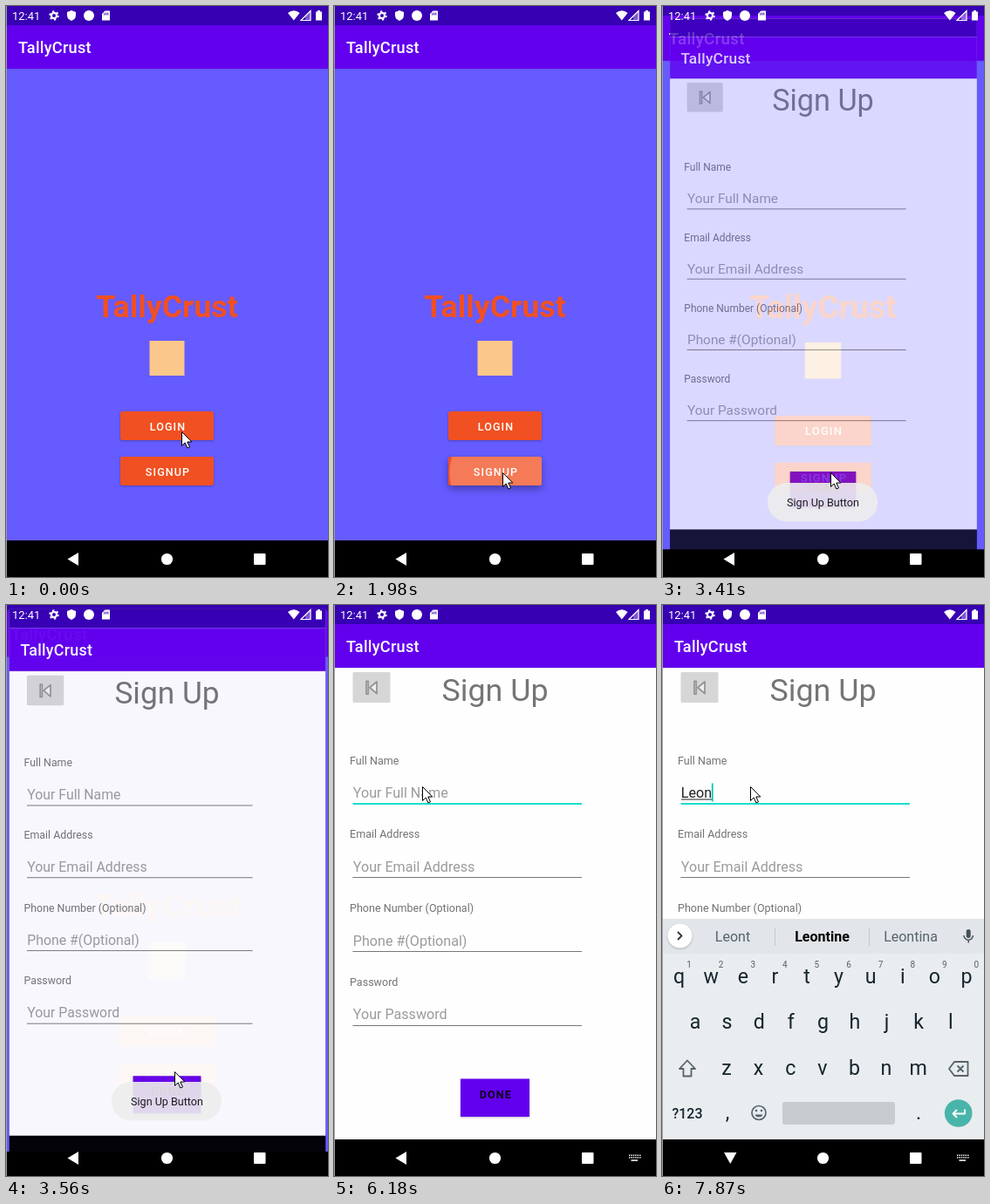
Write an HTML page that moves like this. It is 369 px wide and 655 px high and loops after 8000 ms.

```html
<!DOCTYPE html>
<html lang="en">
<head>
<meta charset="utf-8">
<title>Sign up flow</title>
<style>
  html, body { margin: 0; width: 100%; height: 100%; overflow: hidden; background: #000; }
  svg { display: block; width: 100%; height: 100%; }
  text { font-family: Roboto, Arial, sans-serif; white-space: pre; }
  .mid { text-anchor: middle; }
  .med { font-weight: 500; }
  .caps { font-weight: 500; font-size: 12.5px; letter-spacing: 1.12px; text-anchor: middle; }
  .page { transform-origin: 184.5px 327.5px; }
  .raised { filter: drop-shadow(0 1px 1px rgba(0, 0, 0, .25)); }
  .pressed { filter: drop-shadow(0 4px 4px rgba(0, 0, 0, .32)); }
</style>
</head>
<body>
<svg id="stage" viewBox="0 0 369 655" xmlns="http://www.w3.org/2000/svg"></svg>
<script>
const LOOP = 8000;
const APP = 'TallyCrust';
const NAME = 'Leont';

// Markup helpers
const rect = (x, y, w, h, fill, more = '') =>
  `<rect x="${x}" y="${y}" width="${w}" height="${h}" fill="${fill}" ${more}/>`;
const text = (x, y, str, size, fill, more = '') =>
  `<text x="${x}" y="${y}" font-size="${size}" fill="${fill}" ${more}>${str}</text>`;
const disc = (x, y, r, fill, more = '') =>
  `<circle cx="${x}" cy="${y}" r="${r}" fill="${fill}" ${more}/>`;
const path = (d, fill, more = '') => `<path d="${d}" fill="${fill}" ${more}/>`;
const line = (d, stroke, width) =>
  path(d, 'none', `stroke="${stroke}" stroke-width="${width}" stroke-linejoin="round"`);

const chrome = bg =>
  rect(1, 0, 368, 655, '#000') + rect(1, 0, 368, 613, bg) +
  rect(1, 0, 368, 22, '#3700b3') + rect(1, 22, 368, 50, '#6200ee') +
  rect(1, 72, 368, 1, '#000', 'opacity=".05"') +
  text(14, 53.5, APP, 18.2, '#fff', 'class="med" letter-spacing=".25"');

function welcomePage() {
  const orange = '#f15022';
  const box = (y, fill) => rect(131, y, 107, 33, fill, 'rx="2.5"');
  const button = (y, label, id, extra = '') =>
    `<g id="${id}" class="raised">${box(y, orange)}</g>${extra}` +
    text(185.5, y + 21.7, label, 12.5, '#fff', 'class="caps"');
  const ripple = `<clipPath id="signupBox">${box(517, '#000')}</clipPath>` +
    `<g clip-path="url(#signupBox)">${disc(194, 535, 0, '#fff', 'id="ripple"')}</g>`;
  return chrome('#655bff') +
    text(184.5, 356.5, APP, 35.8, orange, 'class="mid" font-weight="700"') +
    rect(164.5, 384, 40, 40, '#fbc78a') +
    button(465, 'LOGIN', 'login') + button(517, 'SIGNUP', 'signup', ripple);
}

function formPage() {
  const rows = [
    ['Full Name', 'Your Full Name'],
    ['Email Address', 'Your Email Address'],
    ['Phone Number (Optional)', 'Phone #(Optional)'],
    ['Password', 'Your Password']
  ];
  const fields = rows.map(([label, hint], i) => {
    const y = i * 84.8;
    return text(18, 182.5 + y, label, 12.55, '#737373') +
      text(21.8, 221 + y, hint, 16.1, '#9b9b9b', `id="hint${i}"`) +
      rect(21.5, Math.round(227.5 + y), 262.5, 1, '#777', `id="rule${i}"`);
  }).join('');
  const back = rect(21.5, 77, 43, 35, '#d6d6d6', 'rx="1.5"') +
    path('M37 87.5h2.2v14.500H37zM49 88v13.500L41 94.700z', '#f0f0f0',
      'stroke="#959595" stroke-width="1.8" stroke-linejoin="round"');
  return chrome('#fefefe') + back +
    text(184.5, 110, 'Sign Up', 35.8, '#757575', 'class="mid"') + fields +
    text(21.8, 221, '', 16.1, '#222', 'id="typed"') +
    rect(22, 222.5, 0, 1, '#222', 'id="underline"') +
    rect(22, 204.5, 1.8, 21, '#03c9b6', 'id="caret"') +
    rect(145, 543.5, 79, 43.5, '#6200ee', 'class="raised"') +
    text(185.3, 566, 'DONE', 12.5, '#0b0016', 'class="caps" style="font-weight:700"');
}

function keyboard() {
  const ink = '#17252d', dim = '#56636b';
  const key = (x, y, c) => text(x, y, c, 23.2, ink, 'class="mid"');
  const row = (letters, x, y) => [...letters].map((c, i) => key(x + i * 36.6, y, c)).join('');
  const digits = [...'1234567890'].map((c, i) =>
    text(31 + i * 36.6, 415.5, c, 10, dim, 'class="mid"')).join('');
  const words = [[81, 'word0', dim, 400], [183.5, 'word1', '#000', 700], [285, 'word2', dim, 400]]
    .map(([x, id, fill, w]) => text(x, 385.7, '', 16, fill, `id="${id}" class="mid" font-weight="${w}"`)).join('');
  return rect(1, 360, 368, 253, '#e9edf0') + rect(1, 360, 368, 40, '#e2e6ea') +
    disc(20.5, 379.5, 14, '#fff', 'class="raised"') +
    line('M18 375l4.5 4.5-4.5 4.5', '#333', 1.8) +
    `<g id="words">${words}${rect(129, 370, 1, 21, '#c3c9cd')}${rect(237, 370, 1, 21, '#c3c9cd')}</g>` +
    rect(348.7, 372, 5, 10, '#455158', 'rx="2.5"') +
    line('M346 379a5.2 5.2 0 0 0 10.4 0M351.2 384v3.5', '#455158', 1.5) +
    digits + row('qwertyuiop', 19.6, 433.5) + row('asdfghjkl', 38, 486) + row('zxcvbnm', 74, 538.8) +
    line('M29 522.5l9 9.5h-4.5v8.5h-9V532H20z', dim, 1.8) +
    line('M335 524h15.5v16H335l-6-8zM338.5 528.5l7 7M345.5 528.5l-7 7', dim, 1.8) +
    text(29, 588.5, '?123', 16, ink, 'class="mid med"') + key(75, 590, ',') + key(294, 590, '.') +
    disc(111, 582.5, 8, 'none', `stroke="${dim}" stroke-width="1.7"`) +
    disc(108, 580, 1.3, dim) + disc(114, 580, 1.3, dim) +
    path('M106.5 584.5h9a4.7 4 0 0 1-9 0z', dim) +
    rect(138, 570, 129, 26, '#c8ccd0', 'rx="3"') +
    disc(339.7, 583, 15.8, '#49b5aa') +
    line('M347 578.5v5h-13.5M338 579l-4.5 4.5 4.5 4.5', '#fff', 1.8);
}

function statusIcons() {
  const white = '#fff';
  return text(7, 16, '12:41', 13, white) +
    disc(55, 11, 3.1, 'none', `stroke="${white}" stroke-width="2.2"`) +
    disc(55, 11, 4.8, 'none', `stroke="${white}" stroke-width="1.8" stroke-dasharray="2.2 2.827"`) +
    path('M75 5l5 2v3.5q0 4.5-5 6.5-5-2-5-6.5V7z', white) +
    disc(95, 11, 6, white) +
    path('M113.5 5.5h5.5v11h-9V9z', white) +
    path('M112.7 8.2v2.3M114.7 7.5v3M116.8 7.5v3', 'none', 'stroke="#3700b3" stroke-width="1"') +
    path('M323 8q6.8-5.5 13.6 0l-6.8 8.5z', white) +
    path('M349 5.5v11h-11z', 'none', `stroke="${white}" stroke-width="1.2"`) +
    path('M349 5.5v11h-6v-5z', white, 'opacity=".35"') +
    path('M355 6.5h2V5h3v1.5h2v10h-7z', white);
}

function navIcons() {
  const dots = [0, 1].map(r => [0, 1, 2, 3, 4, 5].map(c =>
    rect(338 + c * 2.4, 630.5 + r * 2.6, 1.4, 1.5, '#fff')).join('')).join('');
  return path('M83 627v15l-12.5-7.5z', '#fff', 'id="navBack"') +
    path('M71 628h14.5l-7.25 13z', '#fff', 'id="navDown"') +
    disc(184.5, 634.5, 6.6, '#fff') + rect(284, 628, 13.5, 13, '#fff', 'rx="1"') +
    `<g id="navKeys">${dots}${rect(340.5, 636.3, 7.5, 1.5, '#fff')}</g>`;
}

document.getElementById('stage').innerHTML =
  `<g id="welcome" class="page">${welcomePage()}</g>` +
  `<g id="form" class="page">${formPage()}</g>` +
  `<clipPath id="above">${rect(0, 0, 369, 613, '#000')}</clipPath>` +
  `<g clip-path="url(#above)"><g id="keys">${keyboard()}</g></g>` +
  statusIcons() + navIcons() + rect(0, 0, 1, 655, '#a0a0a0') +
  `<g id="toast">${rect(121, 547, 126, 44.5, '#eee', 'rx="22" opacity=".9"')}` +
  text(184.5, 574.3, 'Sign Up Button', 12.55, '#1c1c1c', 'class="mid"') + '</g>' +
  path('M.5.5v16l3.7-3.5 2.7 6 2.6-1.1-2.7-5.9h5z', '#fff', 'id="pointer" stroke="#000" stroke-width="1"');

const el = {};
document.querySelectorAll('[id]').forEach(node => el[node.id] = node);

// Each track lists [time, value]; a value holds until the next entry.
const tracks = {
  pointer: [[0, [201, 488]], [130, [203, 488]], [410, [208, 488]], [830, [206, 498]], [970, [198, 525]],
    [1110, [193, 535]], [4140, [150, 400]], [4270, [100, 245]], [4410, [88, 219]], [4560, [101, 208]]],
  ripple: [[0, [0, 0]], [1980, [61.5, .24]], [2130, [80, .24]], [2410, [80, .15]], [2560, [80, .06]], [2710, [0, 0]]],
  toast: [[0, 0], [2560, .25], [2710, .55], [2860, .85], [3010, 1], [4270, .75], [4410, .4], [4560, 0]],
  welcome: [[0, 1], [3410, 1.036], [3560, 1.049], [3710, 0]],
  form: [[0, [1, 0]], [3410, [.956, .77]], [3560, [.985, .96]], [3710, [1, 1]]],
  focus: [[0, 0], [4870, 1]],
  caret: [[0, 0], [4870, 1], [6180, 0], [6480, 1], [7430, 0], [7870, 1]],
  typed: [[0, 0], [6480, 1], [6640, 2], [6800, 3], [6970, 4], [7150, 5], [7870, 4]],
  keys: [[0, 253], [6330, 110], [6480, 0]],
  navKeys: [[0, 0], [6180, 1]]
};
const words = [
  ['', '', ''], ['L', 'Love', 'Last'], ['Le', 'Let', 'Left'], ['Leo', 'Leon', 'Leone'],
  ['Leon', 'Leona', 'Leone'], ['Leont', 'Leontine', 'Leontina']
];

function at(name, t) {
  let value;
  for (const [start, v] of tracks[name]) if (t >= start) value = v;
  return value;
}
const show = (node, on) => node.setAttribute('visibility', on ? 'visible' : 'hidden');

function draw(t) {
  const [px, py] = at('pointer', t);
  el.pointer.setAttribute('transform', `translate(${px} ${py})`);

  const [radius, glow] = at('ripple', t);
  el.ripple.setAttribute('r', radius);
  el.ripple.setAttribute('opacity', glow);
  el.signup.setAttribute('class', glow > .1 ? 'pressed' : 'raised');
  el.toast.setAttribute('opacity', at('toast', t));

  const out = at('welcome', t);
  el.welcome.style.display = out ? '' : 'none';
  el.welcome.style.transform = out === 1 ? 'none' : `scale(${out})`;
  const [scale, alpha] = at('form', t);
  el.form.style.display = alpha ? '' : 'none';
  el.form.style.opacity = alpha;
  el.form.style.transform = scale === 1 ? 'none' : `scale(${scale})`;

  const focus = at('focus', t);
  el.rule0.setAttribute('fill', focus ? '#03dac5' : '#777');
  el.rule0.setAttribute('height', focus ? 1.8 : 1);
  el.rule0.setAttribute('y', focus ? 227.2 : 228);

  const count = at('typed', t);
  el.typed.textContent = NAME.slice(0, count);
  const width = count ? el.typed.getComputedTextLength() : 0;
  el.underline.setAttribute('width', width);
  el.caret.setAttribute('x', 21.6 + width);
  show(el.caret, at('caret', t));
  show(el.hint0, !count);

  const drop = at('keys', t);
  el.keys.setAttribute('transform', `translate(0 ${drop})`);
  show(el.keys, drop < 253);
  show(el.words, count && drop < 253);
  // The suggestions lag behind the last deletion.
  const list = words[t >= 7150 ? 5 : count];
  list.forEach((word, i) => el['word' + i].textContent = word);
  show(el.navKeys, at('navKeys', t));
  show(el.navDown, drop < 253);
  show(el.navBack, drop === 253);
}

const begin = performance.now();
function tick() {
  draw((performance.now() - begin) % LOOP);
  requestAnimationFrame(tick);
}
tick();
</script>
</body>
</html>
```
